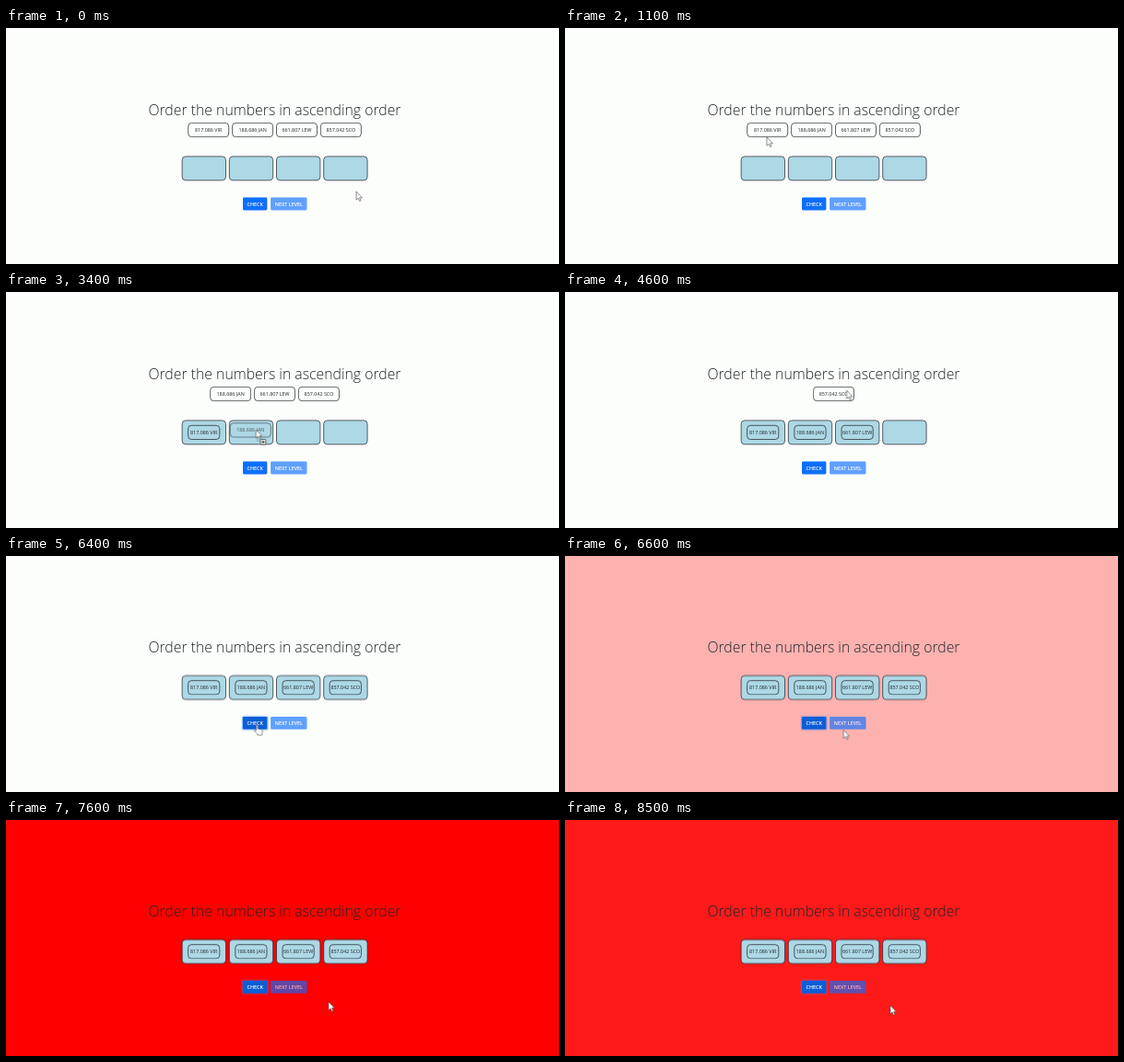
An HTML page that plays this animation: 600 by 257 pixels, repeating every 8.6 s.

```html
<!DOCTYPE html>
<html lang="en">
<head>
<meta charset="utf-8">
<title>Order the numbers</title>
<style>
  html, body { margin: 0; width: 100%; height: 100%; overflow: hidden; }
  svg { display: block; width: 600px; height: 257px; }
  text { font-family: "Open Sans", "Noto Sans", sans-serif; font-size: 5.4px; text-anchor: middle; fill: #212529; }
  .title { font-size: 15.8px; font-weight: 300; }
  .box { fill: none; stroke: #212529; stroke-width: .72; }
  .slot { fill: #add8e6; }
  .btn { fill: #0d6efd; }
  .btn-text { fill: #fff; font-size: 5.4px; font-weight: 600; }
  .ring { fill: none; stroke: #3184fd; stroke-opacity: .5; stroke-width: 1.2; }
  .pointer { fill: #fff; stroke: #444; stroke-width: .6; stroke-linejoin: round; }
  .badge rect { fill: #fff; stroke: #222; stroke-width: .7; }
  .badge path { fill: none; stroke: #222; stroke-width: .9; }
  .badge .shade { fill: none; stroke: #555; stroke-width: .6; stroke-dasharray: 1 1; }
</style>
</head>
<body>
<svg id="stage" viewBox="0 0 600 257"></svg>
<script>
const LOOP = 8600, HOVER = 6150, CLICK = 6300, LEAVE = 6500, RED = 6400, FADE = 8400;
const PAGE = "#fcfefb";
const CARD_STEP = 47.9, SLOT_STEP = 51.2, CARD_Y = 103.4;

// Every card repeats the same drag, one step later and one place further right.
const items = ["817.086 VIR", "188.686 JAN", "661.807 LEW", "857.042 SCO"].map((label, i) => ({
  label,
  card: 197.7 + CARD_STEP * i,
  slot: 191.1 + SLOT_STEP * i,
  gripX: 24 + 4 * i,
  gripY: 9 - 1.8 * i,
  drop: 2500 + 970 * i,
  grab: 1900 + 970 * i
}));
const lastDrop = items[items.length - 1].drop;

// Pointer tip: time, x, y
const path = [
  [0, 380, 178], [100, 380, 178], [900, 226, 132], [1100, 219, 119], [1450, 219, 119],
  ...items.flatMap((it, i) => {
    const from = [it.card - CARD_STEP / 2 * i + it.gripX, CARD_Y + it.gripY];
    const to = [it.slot + 29, 150];
    return [[it.drop - 810, ...from], [it.grab, ...from], [it.drop - 200, ...to], [it.drop, ...to]];
  }),
  [6200, 272.5, 184], [6450, 272.5, 184], [6800, 350, 198], [8150, 350, 198],
  [8400, 353, 202], [LOOP, 353, 202]
];

let css = "", count = 0;

function animate(frames, timing) {
  const name = "k" + count++;
  const body = frames.map(([ms, rule]) => `${(ms / LOOP * 100).toFixed(3)}%{${rule}}`).join("");
  css += `@keyframes ${name}{${body}}.${name}{animation:${name} ${LOOP}ms ${timing} infinite}\n`;
  return name;
}

const steps = frames => animate([...frames, [LOOP, frames[frames.length - 1][1]]], "step-end");
const show = (from, to, alpha = 1) =>
  steps([[0, "opacity:0"], [from, `opacity:${alpha}`], ...(to ? [[to, "opacity:0"]] : [])]);
const hide = (from, to) =>
  steps([[0, "opacity:1"], [from, "opacity:0"], ...(to ? [[to, "opacity:1"]] : [])]);
const move = (x, y) => `transform:translate(${x}px,${y}px)`;
const shift = dy => steps([[0, move(0, 0)], [lastDrop, move(0, dy)]]);

const group = (cls, content) => `<g class="${cls}">${content}</g>`;
const rect = (cls, x, y, w, h, r) =>
  `<rect class="${cls}" x="${x}" y="${y}" width="${w}" height="${h}" rx="${r}"/>`;
const text = (cls, x, y, str) => `<text class="${cls}" x="${x}" y="${y}">${str}</text>`;
const card = (x, y, w, label) => rect("box", x, y, w, 15.2, 3.6) + text("", x + w / 2, y + 9.5, label);
const button = (cls, x, w, label) =>
  rect("btn " + cls, x, 184.6, w, 13.8, 1.3) + text("btn-text", x + w / 2, 193.5, label);

const title = group(shift(9.6), text("title", 291.5, 95, "Order the numbers in ascending order"));

// Remaining cards stay centred after each drop.
const trayMove = steps([[0, move(0, 0)], ...items.map((it, i) => [it.drop, move(-CARD_STEP / 2 * (i + 1), 0)])]);
const tray = group(trayMove,
  items.map(it => group(hide(it.drop), card(it.card, CARD_Y, 44, it.label))).join(""));

const slots = items.map(it =>
  rect("box slot", it.slot, 139.9, 47.4, 26, 3.8) +
  group(show(it.drop), card(it.slot + 6.5, 145.3, 34.2, it.label))).join("");

const checkFill = steps([[0, "fill:#0d6efd"], [HOVER, "fill:#0b5ed7"]]);
const buttons =
  group(show(CLICK), rect("ring", 256.4, 184, 27.6, 15, 1.9)) +
  button(checkFill, 257, 26.4, "CHECK") +
  `<g opacity=".65">${button("", 287.1, 39.4, "NEXT LEVEL")}</g>`;

const ghosts = items.map(it =>
  group(show(it.grab, it.drop, .7), card(-it.gripX, -it.gripY, 44, it.label)) +
  group("badge " + show(it.grab + 250, it.drop),
    rect("shade", 1.4, 7.5, 4, 5, 0) + rect("", 5, 10.6, 5.6, 5.4, .6) +
    `<path d="M6.2 13.3h3.2M7.8 11.7v3.2"/>`)).join("");

const arrow = group(hide(HOVER, LEAVE),
  `<path class="pointer" d="M0 0V9.2L2.1 7.3 3.6 10.5 5 9.9 3.6 6.8H6.4Z"/>`);
const hand = group(show(HOVER, LEAVE),
  `<path class="pointer" d="M-.9.8a.9.9 0 0 1 1.8 0V4.2L5.2 5.2Q6 5.6 6 6.5L5.4 9.5V11H.4V9.8L-3 6.6Q-3.2 5.2-1.6 5.8L-.9 6.3Z"/>`);
const pointer = group(animate(path.map(([ms, x, y]) => [ms, move(x, y)]), "ease-in-out"), ghosts + arrow + hand);

document.body.className = animate([
  [0, `background:${PAGE}`],
  [RED, `background:${PAGE};animation-timing-function:ease`],
  [RED + 1000, "background:#f00"],
  [FADE, "background:#f00;animation-timing-function:ease-in"],
  [LOOP, "background:#ff5252"]
], "linear");

document.getElementById("stage").innerHTML = title + tray + group(shift(-9.6), slots + buttons) + pointer;
document.head.appendChild(document.createElement("style")).textContent = css;
</script>
</body>
</html>
```
